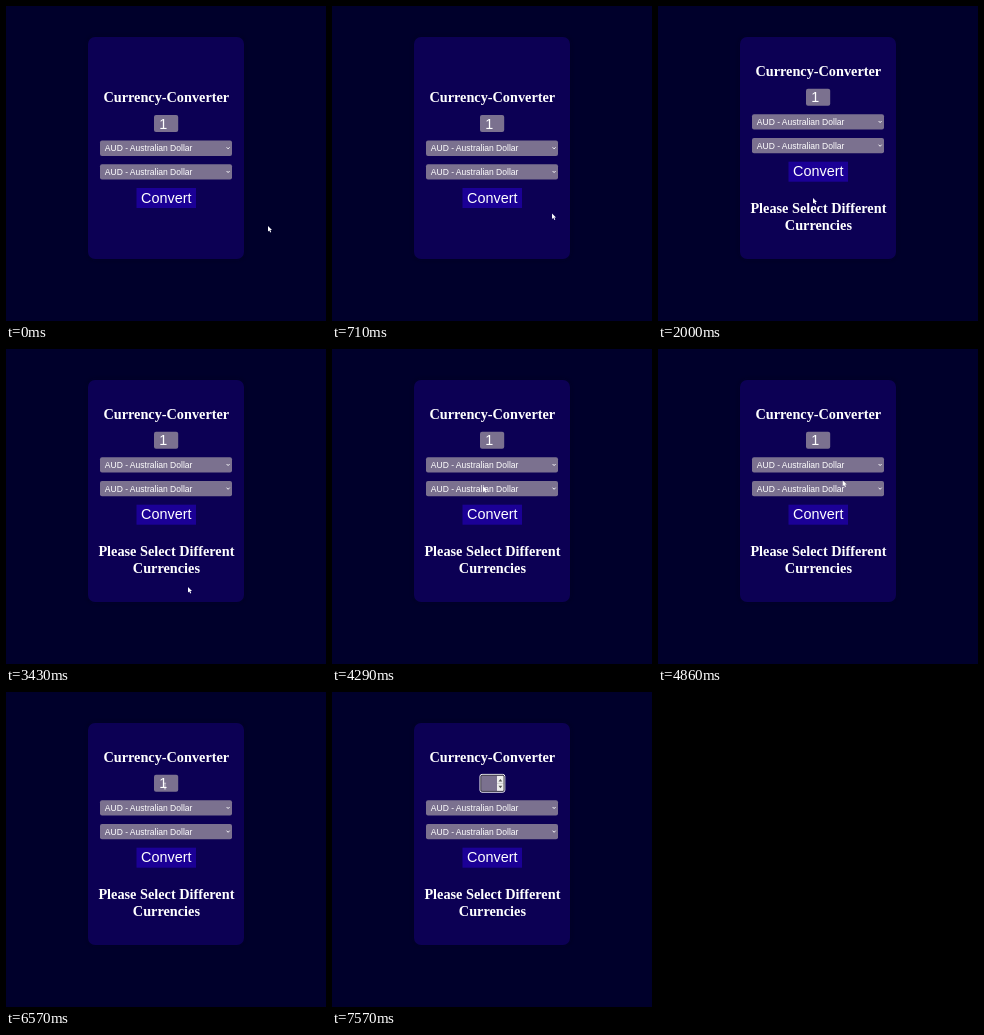
An HTML page for the animation above (8000 ms loop, 320 px wide and 315 px high).

```html
<!DOCTYPE html>
<html lang="en">
<head>
<meta charset="utf-8">
<title>Currency converter</title>
<style>
  html, body { margin: 0; width: 100%; height: 100%; overflow: hidden; background: #00002b; }
  svg { display: block; width: 100%; height: 100%; }
  text { fill: #fff; }
  .serif { font: bold 14.27px "Liberation Serif", serif; text-anchor: middle; }
  .big { font: 14.4px "Liberation Sans", sans-serif; }
  .small { font: 8.52px "Liberation Sans", sans-serif; }
  .field { fill: #7b718f; }
</style>
</head>
<body>
<svg viewBox="0 0 320 315">
  <defs>
    <filter id="shadow" x="-20%" y="-20%" width="140%" height="140%">
      <feGaussianBlur stdDeviation="2"/>
    </filter>
    <g id="select">
      <rect class="field" x="94" width="132" height="15.4" rx="2"/>
      <text class="small" x="98.8" y="10.7">AUD - Australian Dollar</text>
      <path d="M220.6 6.8l1.5 1.6 1.5-1.6" fill="none" stroke="#fff" stroke-width=".9"/>
    </g>
  </defs>
  <rect width="320" height="315" fill="#00002b"/>
  <rect x="82" y="31" width="156" height="222" rx="7" fill="#00001a" opacity=".5" filter="url(#shadow)"/>
  <rect x="82" y="31" width="156" height="222" rx="7" fill="#0c0054"/>

  <g id="form">
    <text class="serif" x="160.3" y="96.3">Currency-Converter</text>
    <rect class="field" x="148" y="109" width="24.2" height="17" rx="2"/>
    <text id="amount" class="big" x="153.2" y="122.7">1</text>
    <g id="focus">
      <rect x="165" y="110.2" width="6.8" height="15" fill="#eee"/>
      <path d="M166.5 115.8l1.9-2.6 1.9 2.6zM166.5 120l1.9 2.6 1.9-2.6z" fill="#555"/>
      <path d="M165 117.7h6.8" stroke="#bbb" stroke-width=".6"/>
      <rect x="148" y="108.7" width="24.8" height="17.8" rx="2" fill="none" stroke="#fff"/>
      <rect x="148.8" y="109.5" width="23.2" height="16.2" rx="1.5" fill="none" stroke="#111" stroke-width=".6"/>
    </g>
    <use href="#select" y="134.5"/>
    <use href="#select" y="158.2"/>
    <rect x="130.5" y="182" width="59.5" height="20" fill="#1b0096"/>
    <text class="big" x="135.1" y="196.7">Convert</text>
  </g>

  <g id="message" class="serif">
    <text x="160.4" y="207.2">Please Select Different</text>
    <text x="160.4" y="223.9">Currencies</text>
  </g>

  <g id="cursor">
    <path id="arrow" d="M0 0v6.6l1.5-1.4 1.2 2.5 1.1-.5-1.1-2.4h2z" fill="#fff"/>
    <path id="hand" d="M1.2 0q.8-.3 1 .5v2.1l2.7.6q.8.3.6 1.2l-.7 2.4H1.9L0 4.1q.3-.7 1.2.1z" fill="#fff"/>
    <path id="beam" d="M-1.3-3.4h2.6M0-3.4v6.8M-1.3 3.4h2.6" fill="none" stroke="#fff" stroke-width=".6"/>
  </g>
</svg>
<script>
const LOOP = 8000, STEP = 1000 / 7;
const el = id => document.getElementById(id);
const show = (id, on) => el(id).style.display = on ? "" : "none";

// Each move runs from start to end; the pointer rests in between
const home = { x: 262, y: 220 };
const moves = [
  { start: 0, end: 1570, x: 165, y: 191 },
  { start: 1860, end: 2000, x: 155, y: 192 },
  { start: 2860, end: 3430, x: 182, y: 238 },
  { start: 3430, end: 4290, x: 151, y: 137 },
  { start: 4290, end: 5430, x: 219, y: 126 },
  { start: 5430, end: 6710, x: 157, y: 93 }
];

function pointAt(t) {
  let { x, y } = home;
  for (const m of moves) {
    const k = Math.min(1, Math.max(0, (t - m.start) / (m.end - m.start)));
    const e = k * k * (3 - 2 * k);
    x += (m.x - x) * e;
    y += (m.y - y) * e;
  }
  return { x, y };
}

function draw(now) {
  // The screen refreshes seven times a second
  const t = Math.floor((now % LOOP + 4) / STEP) * STEP % LOOP;
  const sent = t >= 1995, focused = t >= 6700, cleared = t >= 7565;
  const shift = sent ? -26.3 : 0;
  const { x, y } = pointAt(t);
  const over = (l, top, r, b) => x >= l && x <= r && y - shift >= top && y - shift <= b;
  const onButton = over(131, 182, 190, 202);
  const onInput = over(148, 109, 172, 126);

  el("form").setAttribute("transform", `translate(0 ${shift})`);
  el("cursor").setAttribute("transform", `translate(${x} ${y}) scale(.85)`);
  show("message", sent);
  show("amount", !cleared);
  show("focus", focused);
  show("cursor", !cleared);
  show("hand", onButton);
  show("beam", onInput);
  show("arrow", !onButton && !onInput);
}

function frame(now) {
  draw(now);
  requestAnimationFrame(frame);
}
draw(0);
requestAnimationFrame(frame);
</script>
</body>
</html>
```
